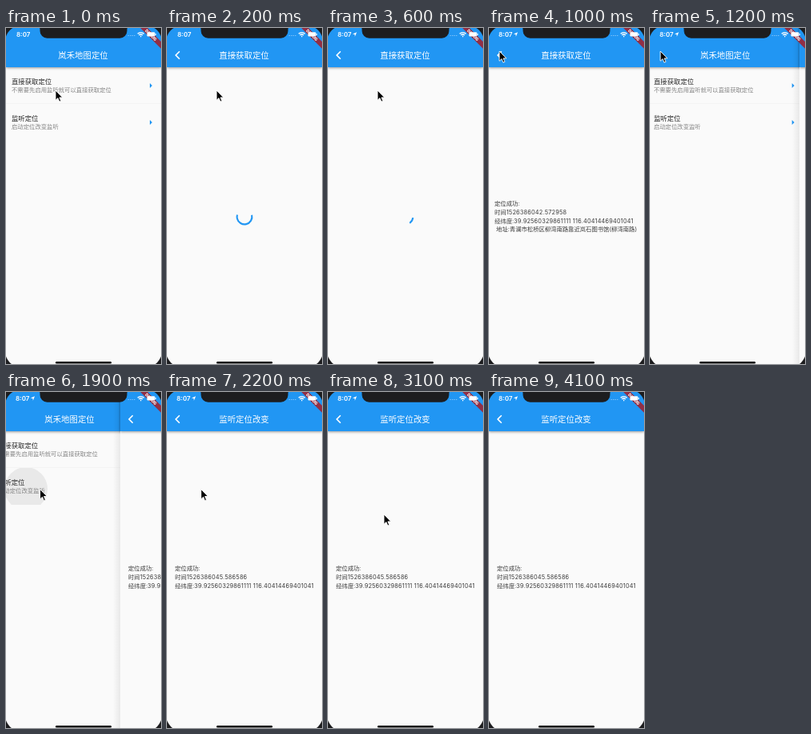
Write an HTML page that moves like this. It is 194 px wide and 420 px high and loops after 4400 ms.

```html
<!DOCTYPE html>
<html lang="zh-CN">
<head>
<meta charset="utf-8">
<title>定位</title>
<style>
  html, body { margin: 0; width: 100%; height: 100%; overflow: hidden; background: #fafafa; }
  #stage {
    position: relative; width: 194px; height: 420px; overflow: hidden;
    font-family: Inter, "Noto Sans CJK SC", "Noto Sans CJK", sans-serif;
    white-space: pre; cursor: default;
  }
  .page { position: absolute; inset: 0; background: #fafafa; }
  .pushed::before {
    content: ""; position: absolute; left: -9px; top: 0; width: 9px; height: 420px;
    background: linear-gradient(to right, transparent, rgba(0, 0, 0, .07));
  }
  header {
    position: absolute; left: 0; top: 0; width: 193px; height: 49px;
    padding-right: 1px; background: #2196f3; color: #fff;
    box-shadow: 0 1px 3px rgba(0, 0, 0, .4);
    font-size: 10.4px; font-weight: 500; line-height: 69px; text-align: center;
  }
  .back { position: absolute; left: 9px; top: 28px; width: 9px; height: 12px; }
  .back path { fill: none; stroke: #fff; stroke-width: 1.6; }

  .tile { position: absolute; left: 0; width: 194px; height: 46px; overflow: hidden; }
  .tile:first-child { border-bottom: 1px solid #f4f4f4; height: 45px; }
  .tile b, .tile span { position: absolute; left: 7px; line-height: 10px; }
  .tile b { top: 12.5px; font-size: 8.4px; font-weight: 400; color: #262626; }
  .tile span { top: 23.6px; font-size: 7.35px; color: #858585; }
  .tile::after {
    content: ""; position: absolute; left: 180px; top: 20px;
    border: solid transparent; border-width: 3px 0 3px 3.5px; border-left-color: #2196f3;
  }
  .ripple { position: absolute; border-radius: 50%; background: #e9e9e9; transform: translate(-50%, -50%); }

  .result { position: absolute; font-size: 7.34px; line-height: 10.6px; color: #3a3a3a; }
  .result i { font-style: normal; letter-spacing: .2px; }
  #chrome { position: absolute; inset: 0; }
  #clock { font-size: 8px; font-weight: 600; fill: #fff; }
  .debug { font-size: 5.2px; font-weight: 800; fill: #fff; text-anchor: middle; }
</style>
</head>
<body>
<div id="stage">
  <section class="page" id="list">
    <div class="tile" style="top:49px"><i class="ripple"></i><b>直接获取定位</b><span>不需要先启用监听就可以直接获取定位</span></div>
    <div class="tile" style="top:95px"><i class="ripple"></i><b>监听定位</b><span>启动定位改变监听</span></div>
    <header>岚禾地图定位</header>
  </section>

  <section class="page pushed" id="locate">
    <header>直接获取定位<svg class="back"><path d="M6.700 1.200 2 6l4.700 4.800"/></svg></header>
    <svg id="spinner" style="position:absolute;left:85px;top:224px" width="24" height="24">
      <circle id="arc" cx="12" cy="12" r="9.4" pathLength="360" fill="none" stroke="#2196f3" stroke-width="2.1"/>
    </svg>
    <div class="result" id="found" style="left:7px;top:215.4px">定位成功:
时间<i>1526386042.572958</i>
经纬度:<i>39.92560329861111 116.40414469401041</i>
 地址:青澜市松桥区柳湾南路靠近岚石图书馆(柳湾南路)</div>
  </section>

  <section class="page pushed" id="listen">
    <header>监听定位改变<svg class="back"><path d="M6.700 1.200 2 6l4.700 4.800"/></svg></header>
    <div class="result" style="left:10px;top:216.4px">定位成功:
时间<i>1526386045.586586</i>
经纬度:<i>39.92560329861111 116.40414469401041</i></div>
  </section>

  <svg id="chrome" viewBox="0 0 194 420" width="194" height="420">
    <!-- debug ribbon -->
    <g transform="translate(194 -3.6) rotate(45)">
      <rect x="-30" y="14.5" width="60" height="6.3" fill="#912f46"/>
      <text class="debug" y="19.5">DEBUG</text>
    </g>
    <!-- status bar -->
    <text id="clock" x="13" y="11">8:07</text>
    <path id="gps" d="M36 5.2 30.8 7.6l2.6.4.4 2.7z" fill="#fff"/>
    <path d="M152.500 9.500h9" stroke="#fff" stroke-opacity=".4" stroke-dasharray="1.500 1"/>
    <g fill="none" stroke="#fff" stroke-width="1.300">
      <path d="M164.700 7.300a5.500 5.500 0 0 1 8 0M166.400 9a3.200 3.200 0 0 1 4.600 0"/>
      <path d="M168 10.500h1.400"/>
    </g>
    <rect x="176.500" y="5.200" width="10" height="5.400" rx="1.300" fill="#fff"/>
    <path d="M187.300 7v2" stroke="#fff"/>
    <!-- device edge, notch, home bar -->
    <path fill="#1d1d1f" fill-rule="evenodd" d="M-9-9H203V429H-9zM19-3A20 20 0 0 0-1 17V404a20 20 0 0 0 20 20H175a20 20 0 0 0 20-20V17A20 20 0 0 0 175-3z"/>
    <path fill="#1d1d1f" d="M40-1q2.500 0 2.500 3v1.700a9 9 0 0 0 9 9h91a9 9 0 0 0 9-9V2q0-3 2.500-3z"/>
    <rect x="62" y="416.900" width="70" height="2.500" rx="1.250" fill="#000"/>
    <path id="pointer" d="M0 0v12.300l2.900-2.700 1.900 4.500 2-.8-1.900-4.400H8.700z" fill="#000" stroke="#fff" stroke-width=".9"/>
  </svg>
</div>

<script>
const LOOP = 4400, STEP = 100, WIDTH = 194;
const $ = id => document.getElementById(id);
const ripples = document.querySelectorAll('.ripple');

// Each row: time, then the values held or blended towards the next row
const pointerPath = [
  [0, 62, 78], [700, 62, 78], [1000, 13, 29], [1200, 13, 29], [1600, 42.6, 121.6],
  [2400, 42.6, 121.6], [2700, 70, 153], [3400, 70, 153], [3600, 69, 187],
  [3800, 69, 187], [4000, 66, 259]
];
const locateSlide = [[0, 194], [100, 62], [200, 0], [1000, 0], [1100, 100], [1200, 187], [1300, 194]];
const listenSlide = [[1800, 194], [1900, 143], [2000, 16], [2100, 0]];

function at(rows, t) {
  const i = rows.findIndex(row => row[0] > t);
  if (i === 0) return rows[0].slice(1);
  if (i < 0) return rows.at(-1).slice(1);
  const [from, to] = [rows[i - 1], rows[i]];
  const k = (t - from[0]) / (to[0] - from[0]);
  return from.slice(1).map((v, n) => v + (to[n + 1] - v) * k);
}

// cubic-bezier(.4, 0, .2, 1)
function ease(x) {
  x = Math.min(1, Math.max(0, x));
  let lo = 0, hi = 1;
  for (let i = 0; i < 20; i++) {
    const s = (lo + hi) / 2, r = 1 - s;
    if (1.2 * r * r * s + .6 * r * s * s + s ** 3 < x) lo = s; else hi = s;
  }
  return lo * lo * (3 - 2 * lo);
}

function slide(page, x) {
  page.style.visibility = x < WIDTH ? 'visible' : 'hidden';
  page.style.transform = `translateX(${x}px)`;
}

function show(el, on) { el.style.display = on ? '' : 'none'; }

function ripple(el, x, y, r, on) {
  show(el, on);
  el.style.left = x + 'px';
  el.style.top = y + 'px';
  el.style.width = el.style.height = 2 * r + 'px';
}

function spin(t) {
  const u = Math.max(0, .25 + (t - 200) * .0013);
  const tail = ease(2 * u - 1) * 270;
  const sweep = Math.max(1, ease(2 * u) * 270 - tail);
  $('arc').setAttribute('stroke-dasharray', `${sweep} ${360 - sweep}`);
  $('arc').setAttribute('transform', `rotate(${tail + u * 306 - 90} 12 12)`);
}

function draw(t) {
  const [px, py] = at(pointerPath, t);
  const [a] = at(locateSlide, t), [b] = at(listenSlide, t);
  slide($('locate'), a);
  slide($('listen'), b);
  $('list').style.transform = `translateX(${(Math.min(a, b) - WIDTH) / 3}px)`;

  ripple(ripples[0], 62, 29, 27, t >= 100 && t < 200);
  ripple(ripples[1], 42, 26, 27 + (t - 1900) * .3, t >= 1900 && t < 2100);

  const found = t >= 700;
  show($('spinner'), !found);
  show($('found'), found);
  if (!found) spin(t);

  const tracking = t >= 300;
  show($('gps'), tracking);
  $('clock').setAttribute('x', tracking ? 12 : 13);

  show($('pointer'), t < 4100);
  $('pointer').setAttribute('transform', `translate(${px} ${py})`);
}

const start = performance.now();
function frame() {
  const t = (performance.now() - start) % LOOP;
  draw(Math.floor(t / STEP) * STEP);
  requestAnimationFrame(frame);
}
frame();
</script>
</body>
</html>
```
